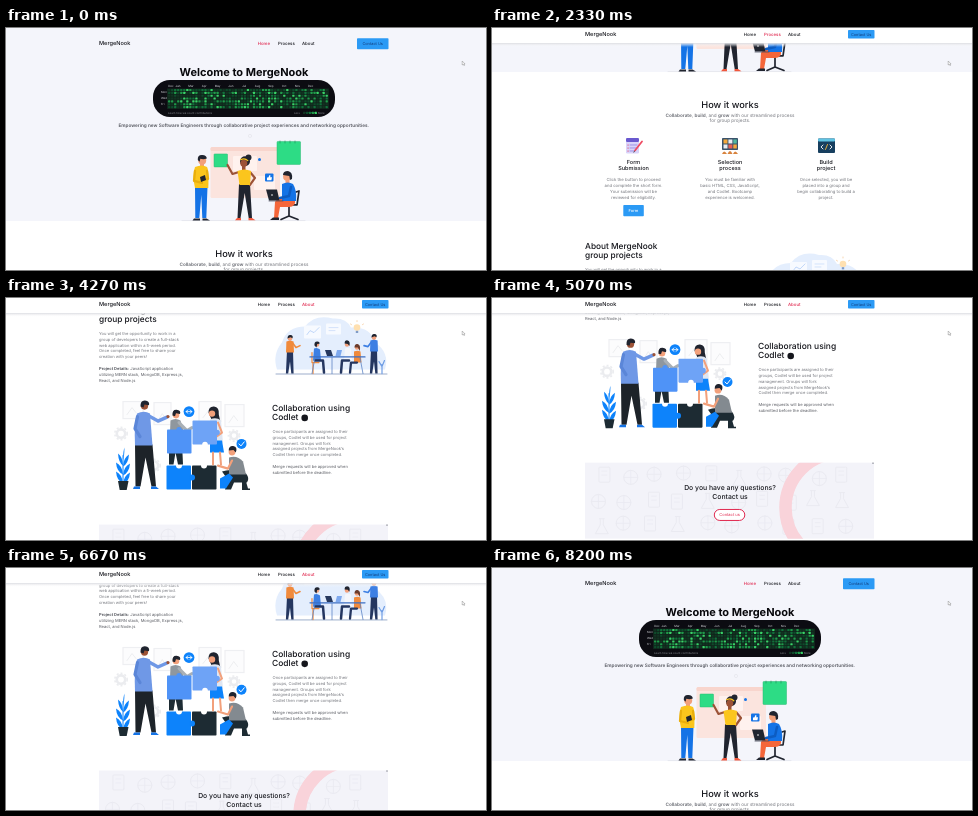
An HTML page for the animation above (8270 ms loop, 480 px wide and 242 px high).

```html
<!DOCTYPE html>
<html lang="en">
<head>
<meta charset="utf-8">
<title>MergeNook</title>
<style>
html, body { margin: 0; width: 100%; height: 100%; overflow: hidden; background: #fff; }
svg { display: block; width: 480px; height: 242px; font-family: Inter, "Open Sans", sans-serif; text-rendering: geometricPrecision; }
</style>
</head>
<body>
<svg id="stage" viewBox="0 0 480 242"></svg>
<script>
const RED = '#e0284f', BLUE = '#2b9af5', INK = '#15161c', GREY = '#74767d';
const SKIN = '#f2a07b', BROWN = '#9c5236', NAVY = '#20242f', COBALT = '#1473e6', AZURE = '#0d83fb';

// Drawing helpers
const rect = (x, y, w, h, fill, r = 0, more = '') =>
  `<rect x="${x}" y="${y}" width="${w}" height="${h}" rx="${r}" fill="${fill}" ${more}/>`;
const dot = (x, y, r, fill, more = '') => `<circle cx="${x}" cy="${y}" r="${r}" fill="${fill}" ${more}/>`;
const shape = (d, fill) => `<path d="${d}" fill="${fill}"/>`;
const line = (d, color, w = 1) =>
  `<path d="${d}" fill="none" stroke="${color}" stroke-width="${w}" stroke-linecap="round" stroke-linejoin="round"/>`;
// y is the vertical middle of the capitals
const text = (x, y, str, size, { fill = GREY, weight = 400, anchor = 'start', id = '' } = {}) =>
  `<text x="${x}" y="${y + size * 0.36}" font-size="${size}" fill="${fill}" font-weight="${weight}" text-anchor="${anchor}" id="${id}">${str}</text>`;
const mid = (x, y, str, size, opt) => text(x, y, str, size, { ...opt, anchor: 'middle' });
const lines = (x, y, gap, rows, size, opt) => rows.map((s, i) => text(x, y + i * gap, s, size, opt)).join('');
const midLines = (x, y, gap, rows, size, opt) => lines(x, y, gap, rows, size, { ...opt, anchor: 'middle' });

let seed = 11;
const random = () => (seed = (seed * 16807) % 2147483647) / 2147483647;

function nav(y, active, button) {
  const items = [['Home', 251.7], ['Process', 272], ['About', 296]];
  return text(93, y - 0.7, 'MergeNook', 5.6, { fill: INK, weight: 500 }) +
    items.map(([s, x], i) => text(x, y, s, 4.35, { fill: i ? INK : active, weight: 500, id: active === INK ? 'nav' + i : '' })).join('') +
    button;
}

function contributions() {
  const months = 'Dec Jan Mar Apr May Jun Jul Aug Sep Oct Nov Dec'.split(' ');
  const shades = ['#123322', '#0e4a2b', '#11703b', '#1f9a4a', '#39d368'];
  let out = rect(147, 52, 182, 37, '#0c0c12', 17) + rect(161, 60.5, 162, 20.5, '#10251b');
  months.forEach((m, i) => out += mid(i < 2 ? 165 + i * 7 : 185 + (i - 2) * 13.3, 57.6, m, 2.9, { fill: '#d5d7db' }));
  ['Mon', 'Wed', 'Fri'].forEach((d, i) => out += text(155, 64.4 + i * 5.8, d, 2.8, { fill: '#d5d7db' }));
  for (let w = 0; w < 53; w++) for (let d = 0; d < 7; d++)
    out += rect(162 + w * 3.03, 61 + d * 2.85, 2.3, 2.1, shades[Math.floor(random() ** 1.5 * 5)], 0.4);
  out += text(162, 85, 'Learn how we count contributions', 2.75, { fill: '#85888f' }) + text(288, 85, 'Less', 2.7, { fill: '#85888f' });
  shades.forEach((c, i) => out += rect(297 + i * 2.9, 83.8, 2.3, 2.3, c, 0.4));
  return out + text(312, 85, 'More', 2.7, { fill: '#85888f' });
}

function heroTeam() {
  return rect(204.5, 119, 69.5, 51, '#fbe4de', 1.5) + rect(204.5, 119, 69.5, 4, '#f8d5cd', 1.5) +
    rect(227, 128, 24, 15, '#fff2ee', 1) + rect(248, 148, 21, 14, '#fff2ee', 1) +
    dot(244, 108, 1.6, 'none', 'stroke="#e2e3ea" stroke-width=".6"') +
    rect(208, 126, 13.5, 13, '#2ddc85', 0.6, 'stroke="#28b873" stroke-width=".5"') +
    rect(271, 113.5, 23.5, 23, '#2ddc85', 0.8, 'stroke="#28b873" stroke-width=".5"') +
    line('M274 113v2M279 113v2M284 113v2M289 113v2', '#187a4c', 0.5) +
    dot(253.5, 131.5, 1.5, COBALT) + rect(259, 145.5, 8.5, 8, COBALT, 1) +
    shape('M261 149.5h1.3l1.2-2.5 1 .5-.3 1.7h1.8l-.6 3h-4.4z', '#fff') +
    line('M176 192.6H299', '#d8dae3', 0.5) +
    // standing, left
    shape('M189 159h12.5l-1.2 31h-4l-1-23-2 23h-4z', COBALT) +
    shape('M188 190.5h6v2h-7.5zM196.5 190.5h4l3.5 2h-7.5z', NAVY) +
    rect(194, 134, 4, 6, SKIN) + dot(196.2, 132.5, 4, SKIN) +
    shape('M191.8 132q-.4-5 4-5 4.8-.2 5 3.5-3 1.3-6.5.3l-.7 3z', NAVY) +
    shape('M189 139q7-3 12 0 2 3 1.3 21H189q-3-13 0-21z', '#fbc51d') +
    line('M189 143l-1 10 8 2M201 143l1 8-5 1', '#e9ae0c', 2.3) + shape('M194 149l5-2 1 5-5 2z', NAVY) +
    // standing, middle
    shape('M233 156h11l2 34h-3.3l-4-25-4.2 25h-3z', NAVY) +
    shape('M231 190h4v2.4h-6zM242.5 190h3.5l3.5 2.4h-7z', '#f0573c') +
    dot(242.5, 129.5, 3, NAVY) + dot(239, 133.3, 5, NAVY) + rect(236, 138, 3.5, 5, BROWN) + dot(237.8, 135.2, 3.5, BROWN) +
    line('M234.8 131.7q4-2 7 1', '#fbc51d', 1.3) +
    line('M233 144l-6.5 2-5-9M244 144l5 6-5 7', BROWN, 2.2) +
    shape('M231.5 143q7-3 13.5 0l-1 14h-10.5z', '#fbc51d') +
    // seated, right
    line('M290 164l3-1-2 14H275M283 177v11M275 191.5l8-3.5 9 3.5', NAVY, 1.7) +
    shape('M289 171q1 8-6 8h-9l-2 11h-4l1-16q1-3 6-3z', '#f4663a') + shape('M267 189.5h6v2.5h-9z', NAVY) +
    rect(279.5, 150, 4, 6, SKIN) + dot(281, 148.8, 3.9, SKIN) +
    shape('M277 147q0-4 5-4 5 1 4 8l-2 1-.7-4z', NAVY) +
    shape('M276 156q6-3 11 0 4 6 3 17h-14z', COBALT) +
    line('M285 159l-2 9-9 2', '#0d5cc2', 2.5) +
    shape('M260 161.5h11l2.5 11H263z', NAVY) + dot(266, 167, 0.8, '#fff') + line('M263 173h14', '#454a58', 0.8);
}

function icons() {
  return rect(134, 259, 13, 15.5, '#d9d4fa', 1.2) + rect(134, 259, 13, 4, '#6a59cf', 1.2) +
    line('M138 266h7M138 269h6M138 272h4', '#8f80df', 0.8) + line('M136 266h.1M136 269h.1M136 272h.1', RED, 1.1) +
    line('M150 262.5l-7 9', '#ee4b62', 1.8) + line('M142.5 272.2l-.6 1', '#333', 0.8) +
    rect(230, 259, 16, 12, '#3a536b', 0.8) + rect(231.5, 260.5, 4, 4, '#f6a83b') + rect(236.4, 260.5, 4, 4, '#e9edf1') +
    rect(241.3, 260.5, 3.5, 4, '#50b9a0') + rect(231.5, 265.5, 4, 4, '#e9edf1') + rect(236.4, 265.5, 4, 4, '#e95e53') +
    rect(241.3, 265.5, 3.5, 4, '#f6a83b') + shape('M230 275q2-5 5 0zM235.5 275q2.5-6 5 0zM241 275q2-5 5 0z', '#d8833e') +
    rect(326, 259.5, 17, 14.5, '#173f5f', 1) + rect(326, 259.5, 17, 3, '#5fc3e3', 1) +
    line('M331 266l-2 2 2 2M338 266l2 2-2 2', '#fff', 0.9) + line('M335.5 265.5l-2 5', '#f6b83b', 0.9);
}

function meeting() {
  const person = (x, top, shirt, legs) =>
    shape(`M${x - 3} ${top + 14}h6l.6 ${431 - top - 14}h-2.3l-1.3-12-1.8 12h-2.3z`, legs) +
    dot(x, top + 2, 2.3, SKIN) + shape(`M${x - 2.5} ${top + 2}q0-4 3-3.6 3 .3 2 3.2l-2-1z`, NAVY) +
    shape(`M${x - 3.6} ${top + 5}q3.6-1.5 7.2 0l.4 11h-8z`, shirt);
  return shape('M271 427q-5-15 5-27 5-16 23-16 10-13 28-8 13-1 18 9 20-1 24 15 15 10 10 27z', '#e4eefd') +
    rect(298, 383, 17, 13, '#f7faff', 1) + line('M301 392l3-4 4 2 5-5', '#a9c8f7', 0.7) +
    rect(320, 381, 15, 11, '#f7faff', 1) + line('M323 385h9M323 388h6', '#c4d9f9', 0.7) +
    dot(351, 385, 3.3, '#ffe0b0') + rect(349.8, 388.2, 2.4, 2.2, '#7f9bc6') +
    line('M351 379v-1M345.5 382l-1-.6M356.5 382l1-.6', '#f2b97b', 0.6) +
    line('M270 431.4H381', '#5b77a8', 0.6) +
    person(284, 394, '#f08a3c', '#243660') + line('M287 401l3 4 4-2', '#f08a3c', 1.6) +
    person(368, 393, '#3d7fe3', '#243660') + line('M365 400l-3 4-4-1', '#3d7fe3', 1.6) +
    // seated at the table
    dot(311, 402, 2.2, SKIN) + shape('M308.5 403q-.5-4.5 3-4.2 2.5.3 2 2.4l-2.3.2-.7 3.6z', NAVY) +
    shape('M308 406q3-1.5 6 1l1 11h-8z', '#3d7fe3') + line('M309 418h8l1 12', '#243660', 2.5) + line('M306 410v10h7M307 420v11', '#f08a3c', 1.2) +
    dot(341, 402, 2.2, SKIN) + shape('M338.6 401q0-3.6 3-3.2 3 .5 1.8 5.5l-1.6-2z', NAVY) +
    shape('M339 406q3-1.5 6 0l1 12h-8z', '#f4f6fb') + line('M343 418h-7l-1 12', '#243660', 2.5) +
    dot(351, 405, 2.2, SKIN) + shape('M348.5 405q0-4 3-3.6 3.5.5 2.3 7l-2-3.4z', '#6b3b2c') +
    shape('M348 409q3.5-1.5 6.5 0l1 11H348z', '#f08a3c') + line('M351 420h-6l-1 10', '#243660', 2.3) +
    shape('M319 407.5h6l2 6h-6z', '#26385e') + shape('M331 407.5h5l-1.5 6h-5z', '#7ea9ee') +
    line('M304 414.3h55', '#3d6fc4', 1.3) + line('M309 415l-3 16M354 415l3 16M326 415v16', '#5d84c4', 0.8) +
    line('M376 431v-9M376 424l-3-5M376 424l2.5-6', '#6f9de4', 1.2);
}

function puzzle() {
  const frame = (x, y, w, h) => rect(x, y, w, h, '#fcfcfd', 0, 'stroke="#eeeff2" stroke-width="1.2"') + line(`M${x + 4} ${y + h - 4}l${w / 4}-7 ${w / 5} 5`, '#e9eaed', 0.8);
  const gear = (x, y, r) => dot(x, y, r, 'none', 'stroke="#ebecef" stroke-width="2.6"') + dot(x, y, r + 2, 'none', 'stroke="#ebecef" stroke-width="1.6" stroke-dasharray="2 2"');
  const piece = (x, y, fill) => rect(x, y, 24.5, 24, fill, 0.8);
  const leaf = (x, y, dx) => shape(`M${x} ${y}q${dx * 0.1}-9 ${dx}-12 ${-dx * 0.1} 9 ${-dx} 12z`, AZURE);
  return frame(117, 459, 20, 17) + frame(148, 460, 17, 22) + frame(193, 459, 22, 20) + frame(219, 462, 19, 22) +
    gear(115, 491, 4.2) + gear(148, 523, 4.2) + gear(228, 493, 3.6) +
    line('M117 541V513', AZURE, 1) + leaf(117, 542, 7) + leaf(117, 541, -7) + leaf(117, 533, 7) + leaf(117, 532, -7) + leaf(117, 524, 6) + leaf(117, 523, -5) + leaf(117, 517, 1.5) +
    shape('M112 538.5h10.5l-1.8 9h-7z', '#1d2b33') +
    piece(160.5, 523, AZURE) + piece(186, 523, '#1d2b33') + dot(186, 535, 3, AZURE) +
    dot(173, 523, 3, '#fff') + dot(198, 523, 3, '#fff') +
    dot(183, 469, 5.4, AZURE) + line('M180 469h6M182 467.3l-2 1.7 2 1.7M184 467.3l2 1.7-2 1.7', '#fff', 0.8) +
    dot(235.5, 501.3, 5, AZURE) + line('M233 501.3l2 2 3.2-4', '#fff', 1) +
    // second person, bent towards the pieces
    shape('M163 500h13l1 22h-5l-2.5-12-2 12H163z', '#1d2b33') +
    dot(170, 472.5, 3.3, SKIN) + shape('M166.5 473q-.6-6 4-5.8 4.8.3 3.5 4.3l-4-.8-1 3z', NAVY) +
    shape('M164.5 478q5-3 10 0l3 10-1 13h-13z', '#8f979e') + line('M173 480l8 8 5-3', '#a9b0b6', 3) +
    piece(161, 487, '#4f93f7') + dot(173, 487, 2.6, '#4f93f7') +
    // woman
    shape('M202.5 470q0-6.5 5.5-6.2 5.5.5 4.8 8l1.7 8-9-3z', NAVY) + dot(206, 471, 3.2, SKIN) +
    shape('M204 477q6-3 11 1l2 22h-13z', '#dfe6f2') + line('M212 480l4 10-7 5', SKIN, 2) +
    shape('M204 498h12l2 12h-14z', AZURE) + line('M207 510v12M214 510l1 12', SKIN, 2) +
    piece(186.5, 478, '#6ea3f6') + dot(211, 490, 2.8, '#6ea3f6') + dot(199, 502, 2.8, '#fff') +
    // man on the left
    shape('M129 502h17.5l3.5 42h-4.5l-6-29-5 29h-5z', '#1d2329') + shape('M128 544h6v2.5h-7zM145 544h5l3 2.5h-8z', COBALT) +
    dot(138.5, 463.5, 3.6, BROWN) + shape('M134.5 464q-.3-6.5 4.5-6.2 5 .5 4 4.8l-4.5-.6-1 3z', NAVY) +
    shape('M131 471q7-3.5 13 0l2.5 32H129q-1-22 2-32z', '#6f98e6') +
    line('M143 473.5l9 5 9-4', '#6f98e6', 3.4) + dot(162, 474, 1.6, BROWN) +
    line('M131.5 474l-2.5 12 5 8', '#5b86d8', 3.2) +
    // crouching man
    shape('M216 529q10-4 24 2 4 5 1 9h-13l-3 7h-6l2-11z', '#1d2b33') + shape('M236 539h4l2 7h2v1.5h-8z', '#1d2b33') +
    dot(226, 509.5, 3.4, SKIN) + shape('M222.7 508q0-5 4.5-4.6 4.8.6 2.6 6.6l-2.3-2.6z', NAVY) +
    shape('M223 515q8-3 14 4l3 13h-17z', '#838a90') + line('M226 518l-4 8-10-3', SKIN, 2.2) +
    shape('M214 536l9-5 4 4-7 11h-6z', AZURE);
}

function contactCard() {
  const FAINT = '#eaeaf1';
  const doodles = [
    (x, y) => rect(x, y, 11, 15, 'none', 1, `stroke="${FAINT}"`) + line(`M${x + 3} ${y + 4}h5m-5 4h5`, FAINT, 0.8),
    (x, y) => line(`M${x + 4} ${y}h5m-4 0v6l-5 9h13l-5-9v-6`, FAINT),
    (x, y) => dot(x + 7, y + 7, 7, 'none', `stroke="${FAINT}"`) + line(`M${x} ${y + 7}h14m-7-7v14`, FAINT, 0.8),
  ];
  let out = rect(93, 582, 289, 76, '#f3f3f9');
  for (let i = 0; i < 30; i++)
    out += doodles[Math.floor(random() * 3)](97 + (i % 10) * 27 + random() * 10, 585 + Math.floor(i / 10) * 24 + random() * 6);
  return out + `<clipPath id="half"><rect x="93" y="582" width="252" height="76"/></clipPath>` +
    `<g clip-path="url(#half)">${dot(348, 627, 54.5, 'none', 'stroke="#f9d3da" stroke-width="12.5"')}</g>` +
    rect(380, 582, 2, 1, '#9a9ca4') +
    midLines(238, 606.8, 9, ['Do you have any questions?', 'Contact us'], 6.85, { fill: INK, weight: 500 }) +
    rect(222.3, 628.8, 30.5, 11, '#fff', 5.5, `stroke="${RED}" stroke-width="1"`) +
    mid(237.6, 634.2, 'Contact us', 4, { fill: RED });
}

const bold = s => `<tspan font-weight="700">${s}</tspan>`;
const head = { fill: INK, weight: 500 };
const page =
  rect(0, 0, 480, 193, '#f4f5fb') +
  nav(15.7, RED, rect(351, 10.3, 31.5, 11, BLUE, 0.8) + mid(366.7, 15.8, 'Contact Us', 3.9, { fill: '#123a78' })) +
  mid(238, 44, 'Welcome to MergeNook', 11, { fill: '#08080c', weight: 700 }) + contributions() +
  mid(237.7, 97, 'Empowering new Software Engineers through collaborative project experiences and networking opportunities.', 4.71, { fill: '#55575f', weight: 600 }) +
  heroTeam() +
  mid(238, 226, 'How it works', 9.25, head) +
  midLines(238, 236, 5.3, [`${bold('Collaborate')}, ${bold('build')}, and ${bold('grow')} with our streamlined process`, 'for group projects.'], 4.67) +
  icons() +
  [
    [141.5, ['Form', 'Submission'], ['Click the button to proceed', 'and complete the short form.', 'Your submission will be', 'reviewed for eligibility.']],
    [238, ['Selection', 'process'], ['You must be familiar with', 'basic HTML, CSS, JavaScript,', 'and Codlet. Bootcamp', 'experience is welcomed.']],
    [334, ['Build', 'project'], ['Once selected, you will be', 'placed into a group and', 'begin collaborating to build a', 'project.']],
  ].map(([x, title, rows]) => midLines(x, 283, 6.4, title, 5.55, head) + midLines(x, 301, 5.75, rows, 4.23)).join('') +
  rect(131.3, 326, 20.5, 11.3, BLUE, 0.8) + mid(141.5, 331.6, 'Form', 4, { fill: '#fff', weight: 500 }) +
  lines(93, 367.5, 9, ['About MergeNook', 'group projects'], 8.3, head) +
  lines(93, 391, 5.75, ['You will get the opportunity to work in a', 'group of developers to create a full-stack', 'web application within a 5-week period.', 'Once completed, feel free to share your', 'creation with your peers!'], 4.08) +
  lines(93, 426, 5.85, [`${bold('Project Details:')} JavaScript application`, 'utilizing MERN stack, MongoDB, Express.js,', 'React, and Node.js'], 4.08, { fill: '#5a5c63' }) +
  meeting() + puzzle() +
  lines(266, 465, 9.8, ['Collaboration using', 'Codlet'], 8.45, head) + dot(298.7, 475.3, 3.3, INK) +
  lines(266.5, 489, 5.8, ['Once participants are assigned to their', 'groups, Codlet will be used for project', 'management. Groups will fork', 'assigned projects from MergeNook’s', 'Codlet then merge once completed.'], 4.12) +
  lines(266.5, 524, 5.9, ['Merge requests will be approved when', 'submitted before the deadline.'], 4.12, { fill: '#5a5c63' }) +
  contactCard();

const bar = `<linearGradient id="shade" x2="0" y2="1"><stop stop-color="#dcdde2"/><stop offset="1" stop-color="#fff" stop-opacity="0"/></linearGradient>` +
  rect(0, 15, 480, 4, 'url(#shade)') + rect(0, 0, 480, 15, '#fff') +
  nav(6.2, INK, rect(356, 2, 26.5, 8.6, BLUE, 0.8) + mid(369.2, 6.3, 'Contact Us', 3.9, { fill: '#123a78' }));

const $ = id => document.getElementById(id);
$('stage').innerHTML = `<g id="page">${page}</g><g id="bar">${bar}</g>` +
  `<path d="M456.2 33v4l1-.8.7 1.4.6-.3-.6-1.3h1.2z" fill="#fff" stroke="#888" stroke-width=".5"/>`;

// Scroll position: [ms, px], joined by a smooth monotone curve
const LOOP = 8270;
const keys = [[0, 0], [930, 62], [1470, 106], [1800, 119], [3200, 215.3], [4270, 355.3], [5070, 417.3],
  [5650, 434], [6070, 427], [6670, 379.6], [7870, 24], [8200, 0], [LOOP, 0]];
const slopes = keys.slice(1).map(([t, y], i) => (y - keys[i][1]) / (t - keys[i][0]));
const tangents = keys.map((_, i) => {
  const a = slopes[i - 1] ?? slopes[i], b = slopes[i] ?? a;
  return a * b > 0 ? 2 * a * b / (a + b) : 0;
});

function scrollAt(t) {
  const i = Math.max(0, keys.findIndex(k => k[0] > t) - 1);
  const [t0, y0] = keys[i], [t1, y1] = keys[i + 1], h = t1 - t0, u = (t - t0) / h, v = 1 - u;
  return y0 * v * v * (1 + 2 * u) + y1 * u * u * (3 - 2 * u) + h * u * v * (tangents[i] * v - tangents[i + 1] * u);
}

const start = performance.now();
function draw() {
  const y = scrollAt((performance.now() - start) % LOOP);
  $('page').setAttribute('transform', `translate(0 ${-y})`);
  $('bar').style.display = y > 125 ? '' : 'none';
  $('nav1').setAttribute('fill', y < 330 ? RED : INK);
  $('nav2').setAttribute('fill', y < 330 ? INK : RED);
  requestAnimationFrame(draw);
}
draw();
</script>
</body>
</html>
```
